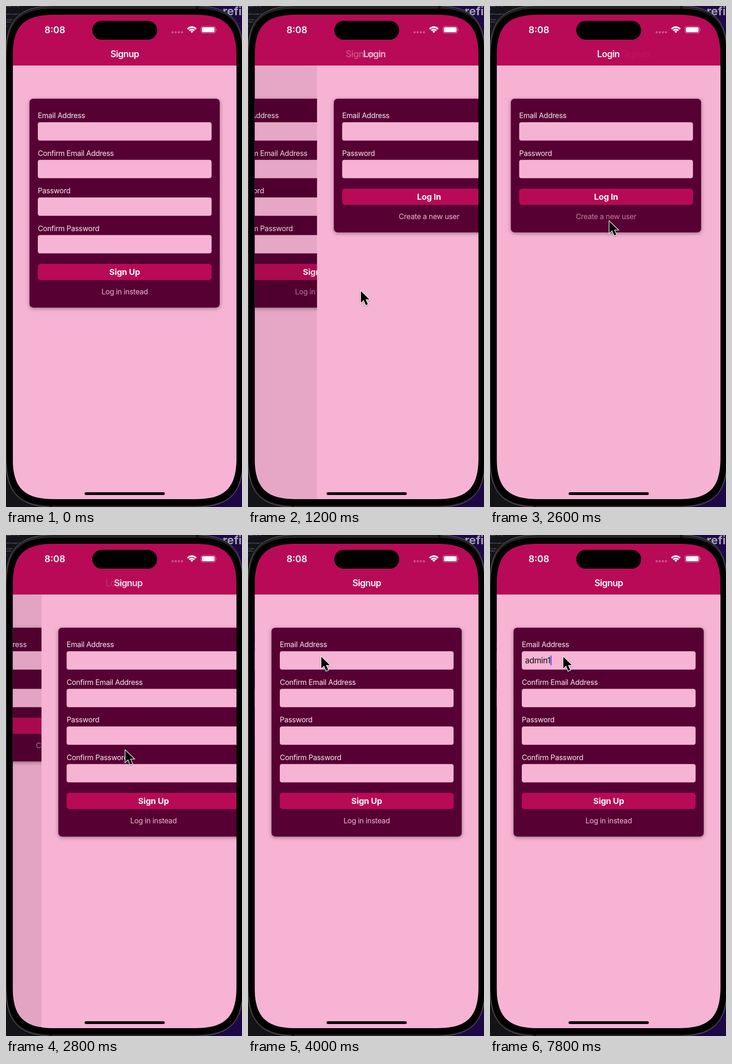
An HTML page for the animation above (8 s loop, 512 px wide and 1086 px high).

```html
<!DOCTYPE html>
<html lang="en">
<head>
<meta charset="utf-8">
<title>Signup flow</title>
<style>
html, body { margin: 0; width: 100%; height: 100%; overflow: hidden; background: #111; }
svg { display: block; width: 100vw; height: 100vh; }
text { font-family: Inter, "Open Sans", sans-serif; white-space: pre; }
.mid { text-anchor: middle; }
.label, .link { font-size: 15.9px; letter-spacing: -.02em; fill: #fce9f2; }
.link { fill: #f7b3d4; }
.btn { font-size: 18px; font-weight: 700; letter-spacing: -.01em; fill: #fff; }
.title { font-size: 19.5px; font-weight: 600; letter-spacing: -.035em; fill: #fff; }
.clock { font-size: 20px; font-weight: 600; fill: #fff; }
.typed { font-size: 17.6px; letter-spacing: -.02em; fill: #12060d; }
.code { font: 4px "DejaVu Sans Mono", monospace; fill: #8790b8; }
.card { filter: drop-shadow(0 2px 4px rgba(0, 0, 0, .38)); }
#cursor { filter: drop-shadow(0 1px 1.5px rgba(0, 0, 0, .35)); }
</style>
</head>
<body>
<svg id="stage" viewBox="0 0 512 1086" preserveAspectRatio="none"></svg>
<script>
const LOOP = 8000, STEP = 200;
const LEFT = 14.5, TOP = 19, WIDTH = 485.5, HEIGHT = 1050, BAR = 129;
const PINK = '#f7b3d4', ROSE = '#b80a56', PLUM = '#560033';

const rect = (x, y, w, h, r, fill, extra = '') =>
  `<rect x="${x}" y="${y}" width="${w}" height="${h}" rx="${r}" fill="${fill}" ${extra}/>`;
const text = (x, y, cls, str, extra = '') =>
  `<text x="${x}" y="${y}" class="${cls}" ${extra}>${str}</text>`;

// Rectangle with continuous corners that reach e along each side
function squircle(x, y, w, h, e) {
  const r = x + w, b = y + h, k = e * .27;
  return `M${x} ${y + e}C${x} ${y + k} ${x + k} ${y} ${x + e} ${y}H${r - e}` +
    `C${r - k} ${y} ${r} ${y + k} ${r} ${y + e}V${b - e}` +
    `C${r} ${b - k} ${r - k} ${b} ${r - e} ${b}H${x + e}` +
    `C${x + k} ${b} ${x} ${b - k} ${x} ${b - e}Z`;
}

function screen(id, labels, action, link) {
  const y = 233 + 81.5 * labels.length;
  const fields = labels.map((label, i) => {
    const top = 252 + 81.5 * i;
    return text(69, top - 8.8, 'label', label) + rect(69, top, 377, 39.7, 4.5, PINK);
  }).join('');
  return `<g id="${id}">` +
    rect(LEFT, BAR, WIDTH, HEIGHT, 0, PINK) +
    rect(51, 201, 412.7, y - 106.3, 8, PLUM, 'class="card"') + fields +
    rect(69, y, 377, 35, 6, ROSE) +
    text(257.5, y + 24, 'btn mid', action) +
    text(257.5, y + 66, 'link mid', link, `id="${id}Link"`) +
    `<g id="${id}Input"></g>` +
    rect(LEFT, BAR, WIDTH, HEIGHT, 0, '#000', `id="${id}Dim"`) + '</g>';
}

function backdrop() {
  const lines = [[2, 'token) => {},'], [7, '},'], [18.5, 'entProvider({'], [31, 'ticate,'], [36, 'token,'], [44, '},']];
  return rect(0, 0, 256, 1086, 0, '#131318') +
    rect(256, 0, 256, 1086, 0, '#1d0846') +
    lines.map(([y, s]) => text(-1, y, 'code', s)).join('') +
    text(470, 20, '', 'refi', 'font-size="25" font-weight="700" fill="#a7a0b2"') +
    text(503, 38, 'code', '..');
}

function phone() {
  return `<path d="${squircle(-.5, -.5, 515, 1087, 108)}" fill="#242426" stroke="#6a6a6c"/>` +
    rect(412, 0, 6, 7, 0, '#111') + rect(94, 1080, 6, 6, 0, '#111') +
    `<path d="${squircle(2, 6, 510.5, 1077, 102)}" fill="#000"/>`;
}

function wifi() {
  const arcs = [[10.6, 7], [6.4, 4]].map(([r, w]) => {
    const d = r * .74;
    return `<path d="M${-d} ${-r * .68}A${r} ${r} 0 0 1 ${d} ${-r * .68}" stroke-width="${w > 5 ? 3.1 : 2.9}"/>`;
  });
  return `<g transform="translate(403.2 58.5) scale(1.18)" fill="none" stroke="#fff">
    ${arcs.join('')}<path d="M0 0L-2.7 -2.9A4 4 0 0 1 2.7 -2.9Z" fill="#fff" stroke="none"/></g>`;
}

function status() {
  const dots = [361.5, 368.2, 375, 381.7]
    .map(x => `<circle cx="${x}" cy="57" r="2.4" fill="#fff" opacity=".3"/>`).join('');
  return text(106, 59.3, 'clock mid', '8:08') + dots + wifi() +
    rect(423, 44, 31.5, 15, 5, 'none', 'stroke="#fff" stroke-opacity=".45" stroke-width="1.2"') +
    rect(425, 46, 27.5, 11, 3.2, '#fff') +
    '<path d="M456 49q2.2 2.5 0 5Z" fill="#fff" opacity=".5"/>' +
    rect(187, 32, 141, 41, 20.5, '#000');
}

document.getElementById('stage').innerHTML = `
  <defs>
    <clipPath id="glass"><path d="${squircle(LEFT, TOP, WIDTH, HEIGHT, 90)}"/></clipPath>
    <clipPath id="body"><rect x="${LEFT}" y="${BAR}" width="${WIDTH}" height="${HEIGHT}"/></clipPath>
  </defs>
  ${backdrop()}${phone()}
  <g clip-path="url(#glass)">
    <g clip-path="url(#body)"><g id="pages">
      ${screen('signup', ['Email Address', 'Confirm Email Address', 'Password', 'Confirm Password'], 'Sign Up', 'Log in instead')}
      ${screen('login', ['Email Address', 'Password'], 'Log In', 'Create a new user')}
    </g></g>
    ${rect(LEFT, TOP, WIDTH, BAR - TOP, 0, ROSE)}
    ${text(257.5, 111, 'title mid', 'Signup', 'id="signupTitle"')}
    ${text(257.5, 111, 'title mid', 'Login', 'id="loginTitle"')}
    ${status()}
    ${rect(170.5, 1054, 174, 6, 3, '#000')}
  </g>
  <path id="cursor" d="M2 4V29L8 23.5L12.5 34.5L17 32.5L12.3 22H20.5Z"
    stroke="#fff" stroke-width="2.6" paint-order="stroke"/>`;

const $ = id => document.getElementById(id);
$('signupInput').innerHTML = text(76, 278.3, 'typed', '', 'id="typed"') +
  rect(0, 261, 2.4, 21.5, 1, '#3a62e2', 'id="caret"');

const pushes = [
  { at: 1044, from: 'signup', to: 'login' },
  { at: 2581, from: 'login', to: 'signup' }
];
const track = [[300, 512, 780], [800, 243, 614], [1800, 243, 614], [2300, 257, 463], [3200, 257, 463], [3700, 157, 260]];
const word = 'admin1', keys = [4800, 5000, 5400, 5800, 6200, 7400], focus = 4200;

// Critically damped spring, 0 to 1
function spring(ms) {
  const a = Math.max(0, ms) * .0163;
  return 1 - (1 + a) * Math.exp(-a);
}

function place(name, x, dim, shift, alpha) {
  $(name).setAttribute('transform', `translate(${x} 0)`);
  $(name + 'Dim').setAttribute('opacity', dim);
  $(name + 'Title').setAttribute('transform', `translate(${shift} 0)`);
  $(name + 'Title').setAttribute('opacity', alpha);
}

function drawPages(t) {
  const { at, from, to } = t < pushes[1].at ? pushes[0] : pushes[1];
  const p = spring(t - at);
  if ($('pages').lastElementChild !== $(to)) $('pages').append($(to));
  place(from, -.3 * WIDTH * p, .1 * p, -20 * p, 1 - p);
  place(to, WIDTH * (1 - p), 0, 60 * (1 - p), p);
  $('signupLink').setAttribute('opacity', t > 900 && t < 1300 ? .7 : 1);
  $('loginLink').setAttribute('opacity', t > 2500 && t < 2900 ? .7 : 1);
}

function drawCursor(t) {
  let i = track.findLastIndex(k => k[0] <= t);
  $('cursor').setAttribute('visibility', i < 0 ? 'hidden' : 'visible');
  i = Math.max(i, 0);
  const [t0, x0, y0] = track[i], [t1, x1, y1] = track[i + 1] || [t0 + 1, x0, y0];
  const u = Math.min(1, Math.max(0, (t - t0) / (t1 - t0))), e = u * u * (3 - 2 * u);
  $('cursor').setAttribute('transform', `translate(${x0 + (x1 - x0) * e} ${y0 + (y1 - y0) * e})`);
}

function drawInput(t) {
  const n = keys.filter(k => k <= t).length;
  $('typed').textContent = word.slice(0, n);
  $('caret').setAttribute('x', 76 + (n ? $('typed').getComputedTextLength() : 0));
  const since = t - (n ? keys[n - 1] : focus);
  $('caret').setAttribute('opacity', since >= 0 && since % 1000 < 600 ? 1 : 0);
}

function draw(ms) {
  const t = Math.floor(ms % LOOP / STEP) * STEP;
  drawPages(t);
  drawCursor(t);
  drawInput(t);
}

const start = performance.now();
function tick() {
  draw(performance.now() - start);
  requestAnimationFrame(tick);
}
tick();
</script>
</body>
</html>
```
